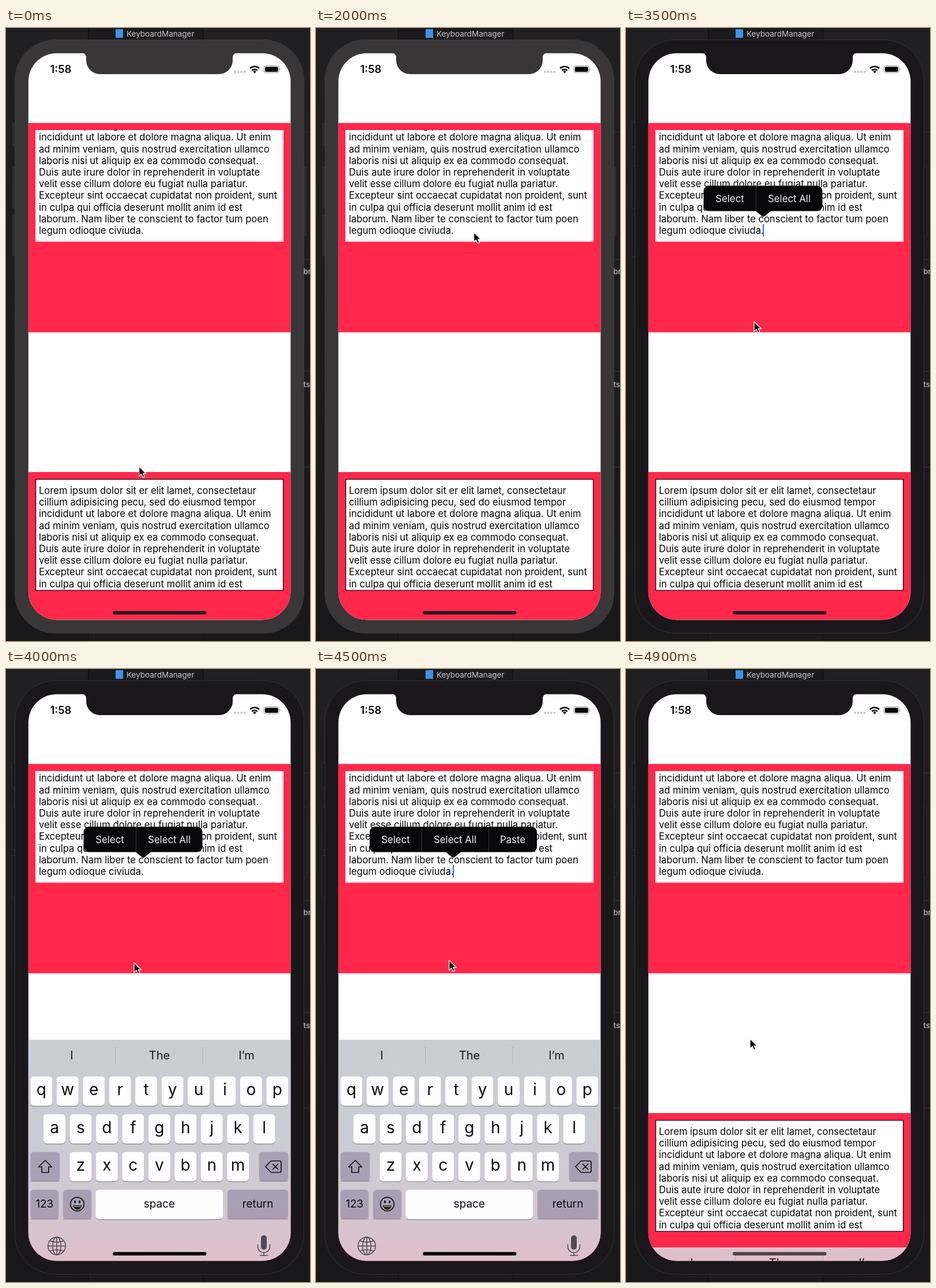
Write an HTML page that moves like this. It is 527x1063 px and loops after 5000 ms.

```html
<!DOCTYPE html>
<html lang="en">
<head>
<meta charset="utf-8">
<title>Text view and keyboard</title>
<style>
@property --y { syntax: '<length>'; inherits: true; initial-value: 383px; }
html, body { margin: 0; width: 100%; height: 100%; overflow: hidden; background: #1e1e20; }
svg { display: block; }
#stage { width: 100%; height: 100%; }
text { font-family: Inter, Roboto, "Open Sans", sans-serif; white-space: pre; }
.mid { text-anchor: middle; }
.para { font-size: 16.6px; letter-spacing: -.02px; fill: #080808; }
.red { fill: #ff284b; }

.bezel, .button, .bar, .caret, .menu, .menu text, .slide, .pointer { animation: 5s step-end infinite; }
.bezel { animation-name: focus; }
.notch { stroke-width: 0; }
.button { animation-name: button; stroke-width: 1; }
.bar { animation-name: bar; }
.caret { animation-name: blink; fill: #3f74dc; }
.pointer { animation-name: move; }
.menu.two, .two text { animation-name: two; }
.menu.three, .three text { animation-name: three; }
.menu path { fill: #08080a; }
.menu line { stroke: #38383a; }
.menu text { fill: #f2f2f2; font-size: 16.8px; }

.slide { animation-name: slide; transform: translateY(var(--y)); }
.still { transform: translateY(calc(-1 * var(--y))); }
.key { fill: #fefdff; }
.dark { fill: rgba(116, 104, 138, .42); }
.shade { fill: #8a8790; }
.dark-shade { fill: rgba(90, 80, 100, .4); }
.letter { font-size: 28px; fill: #0a0a0a; }
.word { font-size: 18.8px; fill: #0a0a0a; }
.hint { font-size: 20px; fill: #151518; }
.icon { fill: none; stroke: #111; stroke-width: 1.7; stroke-linejoin: round; stroke-linecap: round; }
.soft { stroke: #4b4c55; stroke-width: 1.5; }

@keyframes focus {
  0% { fill: #393637; stroke: #3c393a; }
  44%, 100% { fill: #19171a; stroke: #343336; }
}
@keyframes button {
  0% { fill: #2d2b2c; stroke: #1b1a1b; }
  44%, 100% { fill: #19181a; stroke: #303032; }
}
@keyframes bar {
  0% { fill: #2d1a20; }
  76% { fill: #08080a; }
  94% { fill: #56525a; }
  98%, 100% { fill: #55434a; }
}
@keyframes blink {
  0% { opacity: 0; }
  46% { opacity: 1; }
  56% { opacity: .6; }
  58% { opacity: 0; }
  64% { opacity: .3; }
  66% { opacity: .8; }
  68% { opacity: 1; }
  76% { opacity: .5; }
  78% { opacity: 0; }
  84% { opacity: .1; }
  86% { opacity: .6; }
  88% { opacity: 1; }
  94%, 100% { opacity: 0; }
}
@keyframes two {
  0% { opacity: 0; }
  48% { opacity: .35; }
  50% { opacity: .72; }
  52% { opacity: 1; }
  82% { opacity: .5; }
  84% { opacity: .12; }
  86%, 100% { opacity: 0; }
}
@keyframes three {
  0% { opacity: 0; }
  86% { opacity: .5; }
  88% { opacity: 1; }
  94% { opacity: .35; }
  96% { opacity: .06; }
  98%, 100% { opacity: 0; }
}
@keyframes slide {
  0% { --y: 383px; }
  74% { --y: 290px; }
  76% { --y: 120px; }
  78% { --y: 28px; }
  80% { --y: 0px; }
  94% { --y: 72px; }
  96% { --y: 222px; }
  98%, 100% { --y: 360px; }
}
/* The pointer advances in ticks of 100 ms. */
@keyframes move {
  0% { transform: translate(230.5px, 760px); animation-timing-function: steps(6); }
  12% { transform: translate(244px, 610px); animation-timing-function: steps(6); }
  24% { transform: translate(266px, 412px); }
  26% { transform: translate(266px, 412px); animation-timing-function: steps(7); }
  40% { transform: translate(273.5px, 354px); }
  44% { transform: translate(271px, 358px); animation-timing-function: steps(3); }
  50% { transform: translate(249.5px, 406px); animation-timing-function: steps(5); }
  60% { transform: translate(225px, 498px); }
  62% { transform: translate(225px, 498px); animation-timing-function: steps(4); }
  70% { transform: translate(222px, 509px); }
  86% { transform: translate(222px, 509px); animation-timing-function: steps(4); }
  94% { transform: translate(239.5px, 501px); }
  96% { transform: translate(231px, 558px); }
  98%, 100% { transform: translate(215px, 641px); }
}
</style>
</head>
<body>
<svg id="stage" viewBox="0 0 527 1063">
  <defs>
    <clipPath id="screen"><rect x="38.8" y="43.7" width="454.6" height="982.6" rx="49"/></clipPath>
    <clipPath id="topBox"><rect x="51" y="177" width="430" height="193.5"/></clipPath>
    <clipPath id="lowBox"><rect x="51" y="782" width="430" height="193"/></clipPath>
    <linearGradient id="desk" x1="0" y1="0" x2="0" y2="1">
      <stop offset="0" stop-color="#202022"/>
      <stop offset="1" stop-color="#18181a"/>
    </linearGradient>
    <linearGradient id="tint" gradientUnits="userSpaceOnUse" x1="0" y1="643" x2="0" y2="1026">
      <stop offset="0" stop-color="#cacdd4"/>
      <stop offset=".45" stop-color="#cbccd4"/>
      <stop offset=".75" stop-color="#d2c8d1"/>
      <stop offset="1" stop-color="#dfbfca"/>
    </linearGradient>
    <text id="para" class="para"></text>
  </defs>

  <!-- desktop behind the phone -->
  <rect width="527" height="1063" fill="url(#desk)"/>
  <rect x="142" width="199" height="1063" fill="#1a1a1c"/>
  <path d="M142.5 0V1063M341.5 0V1063" stroke="#0c0c0d"/>
  <path d="M517 180.5h10M517 401.5h10M517 595.5h10M517 761.5h10" stroke="#343436"/>
  <rect x="190" y="2" width="13" height="15" fill="#3d92e6"/>
  <text x="209" y="14.5" font-size="13.5" fill="#c9c8ca">KeyboardManager</text>

  <!-- phone body -->
  <g class="button">
    <rect x="10.5" y="163.5" width="10" height="42" rx="2"/>
    <rect x="10.5" y="239.5" width="10" height="74" rx="2"/>
    <rect x="10.5" y="323.5" width="10" height="73" rx="2"/>
    <rect x="510" y="240.5" width="11.5" height="121" rx="2"/>
  </g>
  <rect class="bezel" x="15.5" y="20.5" width="501" height="1029" rx="70"/>
  <g font-size="13" font-weight="600" fill="#a3a2a5">
    <text x="515.5" y="427">br</text>
    <text x="515.5" y="623">ts</text>
  </g>

  <g clip-path="url(#screen)">
    <rect x="38" y="43" width="456" height="984" fill="#fff"/>
    <rect class="red" x="38" y="164.7" width="456" height="363"/>
    <rect class="red" x="38" y="770" width="456" height="257"/>
    <rect x="51" y="177" width="430" height="193.5" fill="#fff"/>
    <rect x="51.6" y="782.6" width="429" height="192.6" fill="#fff" stroke="#14080a" stroke-width="1.3"/>
    <g clip-path="url(#topBox)"><use href="#para" x="57" y="155"/></g>
    <g clip-path="url(#lowBox)"><use href="#para" x="57" y="808"/></g>
    <rect class="caret" x="237" y="340" width="2.2" height="21.5"/>

    <g class="menu two">
      <path d="M143.5 273.5h188a9 9 0 0 1 9 9v26a9 9 0 0 1-9 9h-80.5l-11 9q-2 1.5-4 0l-11-9h-81.5a9 9 0 0 1-9-9v-26a9 9 0 0 1 9-9z"/>
      <line x1="225.5" x2="225.5" y1="274" y2="317"/>
      <text class="mid" x="180" y="301.5">Select</text>
      <text class="mid" x="283" y="301.5">Select All</text>
    </g>
    <g class="menu three">
      <path d="M102 273.5h272a9 9 0 0 1 9 9v26a9 9 0 0 1-9 9h-123l-11 9q-2 1.5-4 0l-11-9h-123a9 9 0 0 1-9-9v-26a9 9 0 0 1 9-9z"/>
      <line x1="183.5" x2="183.5" y1="274" y2="317"/>
      <line x1="299.5" x2="299.5" y1="274" y2="317"/>
      <text class="mid" x="138" y="301.5">Select</text>
      <text class="mid" x="241" y="301.5">Select All</text>
      <text class="mid" x="341" y="301.5">Paste</text>
    </g>

    <!-- keyboard: the tint stays on screen while the panel slides -->
    <g class="slide">
      <svg x="38" y="643" width="456" height="384" viewBox="38 643 456 384">
        <rect class="still" x="38" y="643" width="456" height="800" fill="url(#tint)"/>
      </svg>
      <path d="M189.5 655v30M341 655v30" stroke="#b0b2ba"/>
      <g class="hint mid">
        <text x="114" y="677">I</text>
        <text x="266" y="677">The</text>
        <text x="417" y="677">I’m</text>
      </g>
      <g id="keys"></g>
      <path class="icon" d="M68 852l11.5 11.5h-5.5v9.5h-12v-9.5h-5.5z"/>
      <path class="icon" d="M450 863l8.5-9q1-1 2.5-1h13q3 0 3 3v14q0 3-3 3h-13q-1.5 0-2.5-1zM462.5 858.5l9 9m0-9l-9 9"/>
      <circle class="icon" cx="123.5" cy="928" r="11.8"/>
      <path d="M116 930h15q-1 7.5-7.5 7.5t-7.5-7.5z" fill="#111"/>
      <path d="M117.5 932h12" stroke="#b9adbd" stroke-width="1.5"/>
      <ellipse cx="119.5" cy="924" rx="1.6" ry="2.3"/>
      <ellipse cx="127.5" cy="924" rx="1.6" ry="2.3"/>
      <g class="icon soft">
        <circle cx="88" cy="1000.5" r="15.2"/>
        <ellipse cx="88" cy="1000.5" rx="7.3" ry="15.2"/>
        <path d="M88 985.5v30M73 1000.5h30M76 991.5q12 5 24 0M76 1009.5q12-5 24 0"/>
        <path d="M436.5 998v3.5a10.5 10.5 0 0 0 21 0v-3.5M447 1012v5M440.5 1017h13"/>
      </g>
      <rect x="442" y="982" width="10" height="25" rx="5" fill="#4b4c55"/>
    </g>

    <rect class="bar" x="185" y="1011" width="162.5" height="6" rx="3"/>

    <!-- status bar -->
    <text x="76.5" y="78.2" font-size="18.5" font-weight="600" fill="#0a0a0a">1:58</text>
    <g fill="#c8c8ca">
      <circle cx="397" cy="76" r="2"/><circle cx="402.5" cy="76" r="2"/>
      <circle cx="408" cy="76" r="2"/><circle cx="413.5" cy="76" r="2"/>
    </g>
    <path d="M423 70a11.5 11.5 0 0 1 16 0M426.2 73.6a7 7 0 0 1 9.6 0" fill="none" stroke="#050505" stroke-width="2.6"/>
    <path d="M431 78.5l-2.8-2.9a4 4 0 0 1 5.6 0z" fill="#050505"/>
    <rect x="447" y="65.5" width="26.5" height="12.2" rx="3.6" fill="none" stroke="#8e8e90"/>
    <rect x="448.8" y="67.3" width="22.9" height="8.6" rx="2" fill="#050505"/>
    <path d="M474.8 69.6q2 2 0 4z" fill="#8e8e90"/>
  </g>

  <path class="bezel notch" d="M131 43a8 8 0 0 1 8 8v5a24 24 0 0 0 24 24h206a24 24 0 0 0 24-24v-5a8 8 0 0 1 8-8z"/>

  <g class="pointer">
    <path d="M0 0V17.2L4 13.6L6.7 19.6L9.7 18.3L7.1 12.5H12.4Z" fill="#050505" stroke="#fff" stroke-width="1.3" stroke-linejoin="round"/>
  </g>
</svg>
<script>
const NS = 'http://www.w3.org/2000/svg';
const $ = id => document.getElementById(id);

function add(parent, tag, attrs, label) {
  const el = document.createElementNS(NS, tag);
  for (const name in attrs) el.setAttribute(name, attrs[name]);
  if (label) el.textContent = label;
  parent.appendChild(el);
}

const lines = [
  'Lorem ipsum dolor sit er elit lamet, consectetaur',
  'cillium adipisicing pecu, sed do eiusmod tempor',
  'incididunt ut labore et dolore magna aliqua. Ut enim',
  'ad minim veniam, quis nostrud exercitation ullamco',
  'laboris nisi ut aliquip ex ea commodo consequat.',
  'Duis aute irure dolor in reprehenderit in voluptate',
  'velit esse cillum dolore eu fugiat nulla pariatur.',
  'Excepteur sint occaecat cupidatat non proident, sunt',
  'in culpa qui officia deserunt mollit anim id est',
  'laborum. Nam liber te conscient to factor tum poen',
  'legum odioque civiuda.'
];
lines.forEach((line, i) => add($('para'), 'tspan', { x: 0, y: (i * 20.2).toFixed(1) }, line));

function key(x, y, width, label, kind = 'key', type = 'letter') {
  const box = { x, width, height: 51, rx: 6 };
  if (kind === 'key') add($('keys'), 'rect', { ...box, y: y + 1.3, class: 'shade' });
  else add($('keys'), 'rect', { ...box, y: y + 50, height: 1.5, rx: .7, class: 'dark-shade' });
  add($('keys'), 'rect', { ...box, y, class: kind });
  const base = y + (type === 'letter' ? 32.5 : 30.5);
  if (label) add($('keys'), 'text', { x: x + width / 2, y: base, class: type + ' mid' }, label);
}

[['qwertyuiop', 42.3], ['asdfghjkl', 65], ['zxcvbnm', 110.4]].forEach(([row, x], r) =>
  [...row].forEach((c, i) => key(x + i * 45.45, 706.5 + r * 65.5, 38, c)));
key(42.3, 837.5, 51, '', 'dark');
key(438.5, 837.5, 51, '', 'dark');
key(42.3, 903, 49, '123', 'dark', 'word');
key(98.8, 903, 49.5, '', 'dark');
key(155.2, 903, 221, 'space', 'key', 'word');
key(383.8, 903, 105.5, 'return', 'dark', 'word');
</script>
</body>
</html>
```
